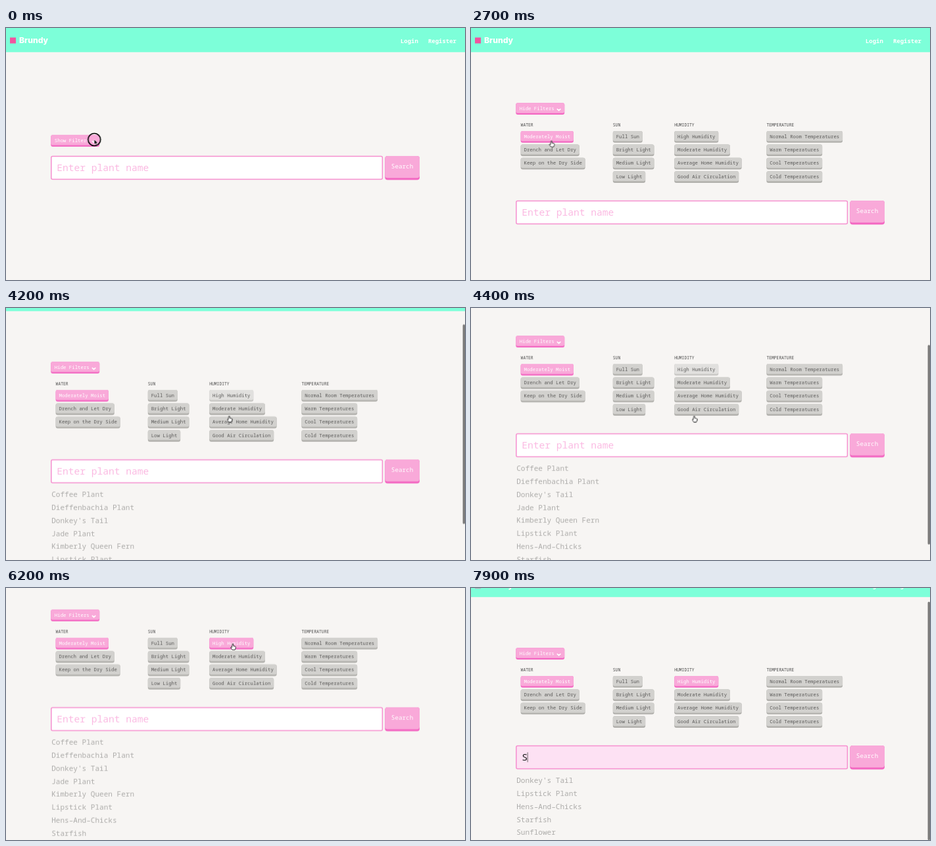
An HTML page that plays this animation: 698 by 384 pixels, repeating every 8 s.

```html
<!DOCTYPE html>
<html lang="en">
<head>
<meta charset="utf-8">
<title>Plant search</title>
<style>
  html, body { margin: 0; width: 100%; height: 100%; overflow: hidden; background: #f7f5f3; }
  svg { display: block; width: 100%; height: 100%; font-family: "Noto Sans Mono", "DejaVu Sans Mono", monospace; }
</style>
</head>
<body>
<svg id="stage" viewBox="0 0 698 384"></svg>
<script>
const LOOP = 8000;
const CHAR = 4.42;   // advance of the small button text
const ROW = 19.85;   // list line pitch
const BAR = 0.79;    // scrollbar travel per scrolled pixel
let rules = '', count = 0;

// Registers a looping keyframe track of [ms, value] stops; returns the attribute that plays it.
function anim(prop, stops, ease = 'step-end') {
  const name = 'track' + count++;
  const all = [...stops, [LOOP, stops[stops.length - 1][1]]];
  rules += `@keyframes ${name}{${all.map(([ms, v]) => `${ms * 100 / LOOP}%{${prop}:${v}}`).join('')}}\n`;
  return `style="animation:${name} ${LOOP}ms ${ease} infinite"`;
}

// Visible only inside the given [from, to] spans.
function during(...spans) {
  const stops = spans[0][0] > 0 ? [[0, 0]] : [];
  for (const [from, to] of spans) {
    stops.push([from, 1]);
    if (to < LOOP) stops.push([to, 0]);
  }
  return anim('opacity', stops);
}

const move = (stops, ease) =>
  anim('transform', stops.map(([ms, x, y]) => [ms, `translate(${x}px,${y}px)`]), ease);
const text = (x, y, size, fill, str, extra = '') =>
  `<text x="${x}" y="${y}" font-size="${size}" fill="${fill}" ${extra}>${str}</text>`;
const rect = (x, y, w, h, r, fill, extra = '') =>
  `<rect x="${x}" y="${y}" width="${w}" height="${h}" rx="${r}" fill="${fill}" ${extra}/>`;
const raised = (x, y, w, h, r, lip, face, edge, faceAnim = '', edgeAnim = '') =>
  rect(x, y, w, h, r, edge, edgeAnim) + rect(x, y, w, h - lip, r, face, faceAnim);

const PINK = '#f9a9d9', HOT = '#f367c2';
const LOOK = {            // face, edge, text
  off: ['#d2d1ce', '#b1b0ac', '#5b5a59'],
  hover: ['#e1e0de', '#c6c5c2', '#5b5a59'],
  on: [PINK, HOT, '#ffffff']
};

function chip(label, x, y, states) {
  const [face, edge, ink] = LOOK.off;
  const part = i => states ? anim('fill', [[0, 'off'], ...states].map(([ms, s]) => [ms, LOOK[s][i]])) : '';
  return raised(x, y, label.length * CHAR + 9.6, 17.8, 3, 2.4, face, edge, part(0), part(1)) +
    text(x + 4.9, y + 10.6, 7.36, ink, label, part(2));
}

const states = {
  'Moderately Moist': [[800, 'hover'], [1800, 'off'], [2300, 'hover'], [2600, 'on']],
  'Drench and Let Dry': [[1800, 'hover'], [2300, 'off']],
  'High Humidity': [[3600, 'hover'], [4800, 'off'], [5200, 'hover'], [6200, 'on']],
  'Moderate Humidity': [[5100, 'hover'], [5200, 'off']],
  'Average Home Humidity': [[5000, 'hover'], [5100, 'off']],
  'Good Air Circulation': [[4900, 'hover'], [5000, 'off']]
};
const groups = [
  [75.6, 'WATER', ['Moderately Moist', 'Drench and Let Dry', 'Keep on the Dry Side']],
  [215.8, 'SUN', ['Full Sun', 'Bright Light', 'Medium Light', 'Low Light']],
  [309.2, 'HUMIDITY', ['High Humidity', 'Moderate Humidity', 'Average Home Humidity', 'Good Air Circulation']],
  [449.4, 'TEMPERATURE', ['Normal Room Temperatures', 'Warm Temperatures', 'Cool Temperatures', 'Cold Temperatures']]
];
const plants = ['Coffee Plant', 'Dieffenbachia Plant', "Donkey's Tail", 'Jade Plant', 'Kimberly Queen Fern',
  'Lipstick Plant', 'Hens–And–Chicks', 'Starfish', 'Sunflower'];

const filters = groups.map(([x, title, labels]) =>
  text(x, 150, 6.35, '#4a4a4a', title) +
  labels.map((label, i) => chip(label, x, 157 + i * 20.4, states[label])).join('')).join('');
const list = names => names.map((name, i) => text(69.2, 320 + i * ROW, 11.05, '#adacaa', name)).join('');

const header = rect(0, 0, 698, 36.8, 0, '#7dffd9') +
  rect(6, 14.5, 9, 9, 0, '#f0559f') +
  text(20, 23.4, 12.2, '#fff', 'Brundy', 'font-weight="800" font-family="Inter, sans-serif"') +
  text(600, 22.6, 8.95, '#fff', 'Login', 'font-weight="600"') +
  text(642, 22.6, 8.95, '#fff', 'Register', 'font-weight="600"');

const toggle = `<g ${move([[0, 0, 48.8], [800, 0, 0]])}>` +
  raised(68.2, 114.2, 74, 17.8, 3, 2.2, PINK, HOT) +
  text(73.8, 125, 7.36, '#fff', 'Show Filters', during([0, 800])) +
  text(73.8, 125, 7.36, '#fff', 'Hide Filters', during([800, LOOP])) +
  '<path d="M131.3 123.6l2.3 2 2.3-2" fill="none" stroke="#fff" stroke-width="1.6" stroke-linecap="round"/></g>';

const form = `<g ${move([[0, 0, -68], [800, 0, 0]])}>` +
  rect(68.8, 263.6, 503.6, 35, 2, '#fff',
    'stroke="#f590cf" stroke-width="1.5" ' + anim('fill', [[0, '#ffffff'], [6900, '#fde1f3']])) +
  text(77.2, 286, 14.6, '#fbb9e2', 'Enter plant name', during([0, 7700])) +
  text(77.2, 286, 14.6, '#222', 'S', during([7700, LOOP])) +
  `<g ${move([[0, 0, 0], [7700, 8.8, 0]])}>` +
  rect(76.8, 273.4, 0.9, 15, 0, '#555', during([6900, 7500], [7700, LOOP])) + '</g>' +
  raised(576.3, 263, 52.7, 36.4, 4, 3, PINK, HOT) +
  text(585.8, 282.4, 9.3, '#fff', 'Search') + '</g>';

const results = `<g ${during([2900, 7700])}>${list(plants)}</g>` +
  `<g ${during([7700, LOOP])}>${list(plants.filter(name => /s/i.test(name)))}</g>`;

const scroll = [[0, 0], [3900, 0], [4000, 0.7], [4100, 9], [4200, 32], [4300, 56], [4400, 71.8],
  [4500, 78], [4600, 80.6], [4700, 81.3], [7699, 81.3], [7700, 23]];
const page = `<g ${move(scroll.map(([ms, y]) => [ms, 0, -y]), 'linear')}>` +
  header + toggle + `<g ${during([800, LOOP])}>${filters}</g>` + form + results + '</g>';

const bars = `<g ${anim('opacity', [[0, 0], [4099, 0], [4100, 1], [5700, 1], [6000, 0]], 'linear')}>` +
  `<g ${move(scroll.map(([ms, y]) => [ms, 0, y * BAR]), 'linear')}>` +
  rect(694.6, -0.5, 3.4, 304, 1.5, '#7d7c7b') + '</g></g>' +
  rect(694.6, 21, 3.4, 363, 1.5, '#7d7c7b', during([7700, LOOP]));

const arrow = `<path d="M0 0v7.2l1.7-1.5 1.2 2.7 1.3-.6-1.2-2.6h2.2z" stroke="#fff" stroke-width=".5" ${during([0, 900])}/>`;
const hand = '<path d="M-.8 .8q0-.9.8-.9t.8.9v2.5l2.6.6q1.1.3 1 1.4l-.5 2.5-.7 1.4h-4l-2.4-3q-.6-1 .2-1.2t1.5.8z" ' +
  `fill="#fff" stroke="#222" stroke-width=".9" stroke-linejoin="round" ${during([900, 6800])}/>`;
const beam = '<path d="M-1.6-3.6q1.6 0 1.6 1v5.2q0 1-1.6 1M1.6-3.6q-1.6 0-1.6 1v5.2q0 1 1.6 1" fill="none" ' +
  `stroke="#333" stroke-width=".8" ${during([6800, 7700])}/>`;
const ring = '<circle r="9.5" fill="none" stroke="#000" stroke-width="1.7" ' +
  anim('opacity', [[0, 1], [100, 0.4], [200, 0], [6900, 1], [7100, 0]]) + '/>';
const pointer = `<g ${move([[0, 134.3, 170], [800, 134.3, 170], [1300, 122.5, 173.5], [1700, 122.5, 173.5],
  [2000, 122, 183], [2200, 122, 182], [2500, 122.5, 172], [2900, 122.5, 172], [3200, 249, 170], [3500, 249, 170],
  [3700, 339.5, 164.5], [4700, 339.5, 164.5], [5300, 345, 85], [6500, 345, 85], [6900, 187.2, 205.5]], 'linear')}>` +
  ring + arrow + hand + beam + '</g>';

document.getElementById('stage').innerHTML = page + bars + pointer;
document.head.appendChild(document.createElement('style')).textContent = rules;
</script>
</body>
</html>
```
